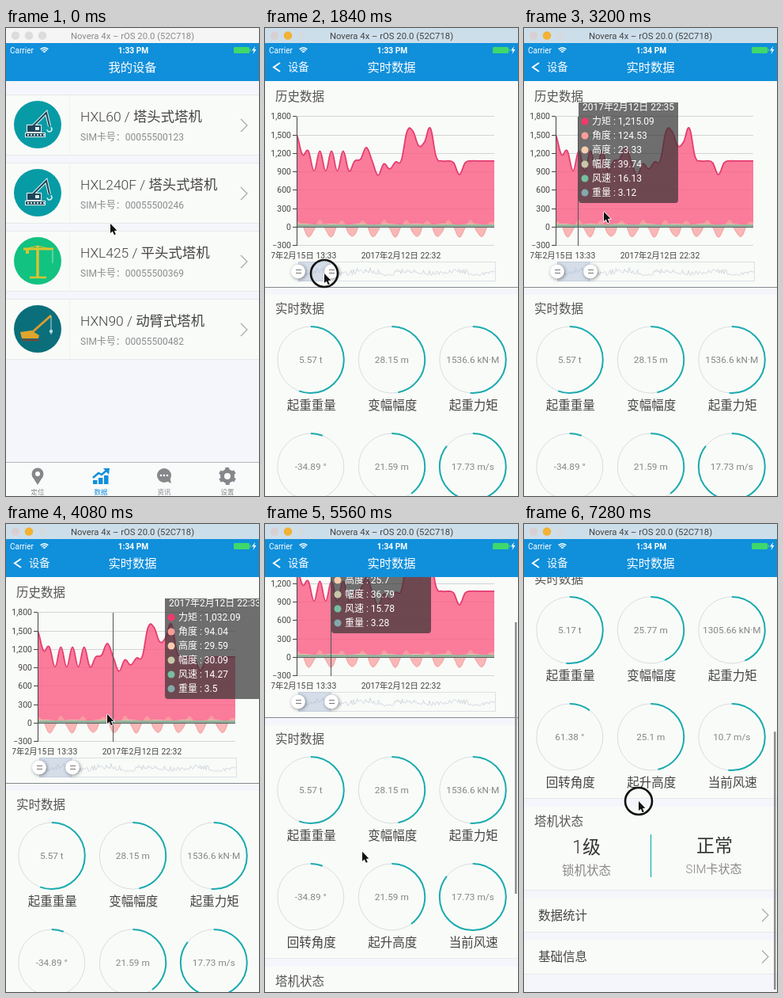
These frames come from a looping animation (320x591 px, 7.4 s). An HTML page with a canvas:

```html
<!DOCTYPE html>
<html lang="zh">
<head>
<meta charset="utf-8">
<style>
html, body { margin: 0; width: 100%; height: 100%; overflow: hidden; background: #f9fbf8; }
canvas { display: block; }
</style>
</head>
<body>
<canvas id="stage" width="320" height="591"></canvas>
<script>
const ctx = document.getElementById('stage').getContext('2d');
const LOOP = 7400, PAPER = '#f9fbf8', BAND = '#f4f6fb', BLUE = '#108fdb', TEAL = '#1aabb0';

// ---- timing ----
// Pointer moves: start, end, target point, and whether the button is down (DRAG also scrolls the page).
const PRESS = 1, DRAG = 2;
const moves = [
  [40, 240, 128, 118], [240, 400, 128, 118, PRESS], [800, 1320, 58, 310], [1520, 1800, 75, 310, PRESS],
  [2280, 2600, 78, 240], [2600, 2840, 70, 238, PRESS], [2840, 3080, 101, 232], [3240, 3600, 135, 238, PRESS],
  [3600, 4080, 128, 240], [4240, 4400, 86, 250, PRESS], [4440, 4640, 97, 380], [4760, 5400, 97, 297, DRAG],
  [5400, 5640, 136, 472], [5640, 6160, 136, 361, DRAG], [6520, 6720, 140, 441], [6880, 7280, 145, 350, DRAG]];

const clamp = v => Math.max(0, Math.min(1, v));
const mix = (a, b, k) => a + (b - a) * k;
const span = (t, a, b) => clamp((t - a) / (b - a));
const easeOut = k => 1 - (1 - k) ** 3;

function pointerAt(t) {
  const p = { x: 132, y: 247, scroll: 0, down: false };
  for (const [from, to, x, y, button] of moves) {
    if (t < from) break;
    const k = span(t, from, to), y0 = p.y;
    p.x = mix(p.x, x, k);
    p.y = mix(y0, y, k);
    p.down = Boolean(button);
    if (button === DRAG) p.scroll += y0 - p.y;
  }
  return p;
}

// ---- drawing helpers ----
function text(s, x, y, size, color, align = 'left', weight = 400) {
  ctx.font = `${weight} ${size}px Roboto, "Noto Sans CJK SC", "Noto Sans CJK", sans-serif`;
  ctx.textAlign = align;
  ctx.fillStyle = color;
  ctx.fillText(s, x, y + size * .37);
}
function rect(x, y, w, h, color) { ctx.fillStyle = color; ctx.fillRect(x, y, w, h); }
function disc(x, y, r, color) { ctx.beginPath(); ctx.arc(x, y, r, 0, 7); ctx.fillStyle = color; ctx.fill(); }
function ring(x, y, r, color, width, from = 0, to = 2 * Math.PI) {
  ctx.beginPath(); ctx.arc(x, y, r, from, to);
  ctx.strokeStyle = color; ctx.lineWidth = width; ctx.stroke();
}
function path(p) {
  ctx.beginPath();
  for (let i = 0; i < p.length; i += 2) ctx.lineTo(p[i], p[i + 1]);
}
function line(color, width, ...p) { path(p); ctx.strokeStyle = color; ctx.lineWidth = width; ctx.stroke(); }
function poly(color, ...p) { path(p); ctx.fillStyle = color; ctx.fill(); }
function rounded(x, y, w, h, r, color) { ctx.beginPath(); ctx.roundRect(x, y, w, h, r); ctx.fillStyle = color; ctx.fill(); }
const chevron = (x, y) => line('#a5a8aa', 1.2, x, y - 8, x + 8, y, x, y + 8);
const heading = (s, y) => text(s, 13, y, 15.5, '#555', 'left', 300);
function group(draw, dx = 0, dy = 0, clip) {
  ctx.save();
  if (clip) { ctx.beginPath(); ctx.rect(...clip); ctx.clip(); }
  ctx.translate(dx, dy);
  draw();
  ctx.restore();
}

// ---- device list ----
const devices = [
  ['HXL60 / 塔头式塔机', '00055500123', '#079ba5', mobileCrane],
  ['HXL240F / 塔头式塔机', '00055500246', '#079ba5', mobileCrane],
  ['HXL425 / 平头式塔机', '00055500369', '#12c281', towerCrane],
  ['HXN90 / 动臂式塔机', '00055500482', '#0a6f7b', luffingCrane]];

function mobileCrane() {
  const body = (color, grow) => {
    line(color, 2 + grow, -6, 2, 11, -15, 15, 2);
    rect(-13 - grow / 2, 1 - grow / 2, 17 + grow, 8 + grow, color);
    rect(-15 - grow / 2, 11 - grow / 2, 24 + grow, 4 + grow, color);
  };
  body('#e3f4f5', 2);
  body('#1f4558', 0);
  rect(-3, 3, 5, 4, '#d9f0f1');
  for (let x = -12; x < 9; x += 4) disc(x, 13, 1.2, '#d9f0f1');
  ring(15, 6, 3, '#e3f4f5', 1.6, -1, 3);
}
function towerCrane() {
  const c = '#d8c430';
  line(c, 3, -18, -15, 20, -15);
  line(c, 1.2, -12, -16, 0, -19, 12, -16);
  line(c, 3.4, 0, -19, 0, 21);
  line(c, 2.5, -10, 21, 11, 21);
  rect(-15, -14, 4, 5, c);
  line('#9de3c4', 1, 19, -13, 19, 3);
}
function luffingCrane() {
  line('#dd9d2c', 3, -10, 7, 17, -17);
  poly('#e0a52c', -22, 4, -8, 2, 2, 8, 1, 12, -20, 12);
  line('#6d4a3c', 2.5, -20, 14, 2, 14);
  line('#b9dcdf', 1, 17, -16, 17, 7);
  disc(17, 3, 2.2, '#b9dcdf');
}
function listPage() {
  rect(0, 67, 320, 524, BAND);
  devices.forEach(([name, sim, color, icon], i) => {
    const y = 85 + i * 86;
    rect(0, y, 320, 75, PAPER);
    line('#e6e9ea', 1, 0, y - .5, 320, y - .5);
    line('#e6e9ea', 1, 0, y + 75.5, 320, y + 75.5);
    line('#eff2f0', 1, 80.5, y, 80.5, y + 75);
    disc(40, y + 37, 30, color);
    group(icon, 40, y + 37);
    text(name, 94, y + 27, 17.4, '#444', 'left', 300);
    text('SIM卡号：' + sim, 94, y + 53, 12, '#8b8d8e');
    chevron(297, y + 38);
  });
  tabBar();
}
function tabBar() {
  const gray = '#85878a';
  rect(0, 548, 320, 43, '#f9fafa');
  line('#b5b8bb', 1, 0, 548.5, 320, 548.5);
  disc(40, 563, 7.5, gray);
  poly(gray, 33, 566, 47, 566, 40, 577);
  disc(40, 563, 3, '#fff');
  for (let i = 0; i < 3; i++) rect(110 + 7 * i, 571 - 3 * i, 5.5, 5 + 3 * i, BLUE);
  line(BLUE, 2.5, 110, 568, 117, 562, 121, 564, 128, 558);
  poly(BLUE, 123, 556, 131, 556, 130, 564);
  disc(200, 565, 9, gray);
  poly(gray, 203, 572, 209, 575, 207, 567);
  for (let x = 196; x <= 204; x += 4) disc(x, 565, 1.3, '#fff');
  ring(280, 566, 6.5, gray, 5);
  for (let a = .5; a < 6.5; a += Math.PI / 3) {
    const c = Math.cos(a), s = Math.sin(a);
    line(gray, 5, 280 + 7 * c, 566 + 7 * s, 280 + 11 * c, 566 + 11 * s);
  }
  ['定位', '数据', '资讯', '设置'].forEach((s, i) => text(s, 40 + 80 * i, 585.5, 8.5, i === 1 ? BLUE : gray, 'center'));
}

// ---- chart ----
const POINTS = 35, GAP = 250 / (POINTS - 1);
const swells = [[.5, 440], [12, 220], [14, -230], [16, -130], [19.5, 800], [21.5, 400], [23, 530], [28, -220]];
const sample = rule => Array.from({ length: POINTS }, (_, i) => rule(i));
// An early zigzag plus a few swells
const torque = sample(i => swells.reduce((sum, [at, size]) => sum + size * Math.exp(-(((i - at) / .7) ** 2)),
  1070 + (i < 10 ? 160 * Math.cos(Math.PI * i) : 0)));
const angle = sample(i => 140 * Math.cos(1.7 * (i - 4)) - 30);
const height = sample(i => 36 + 10 * Math.sin(i * 1.3));
const noise = x => Math.abs(Math.sin(x * 12.9898) * 43758.5453 % 1);
const valueY = v => 251 - v * 23.3 / 300;

function series(data, step, fill, stroke, width) {
  const at = i => [40 + i * step, valueY(data[Math.max(0, Math.min(POINTS - 1, i))])];
  const curve = new Path2D();
  curve.moveTo(...at(0));
  for (let i = 0; i < POINTS - 1; i++) {
    const [a, b, c, d] = [at(i - 1), at(i), at(i + 1), at(i + 2)];
    curve.bezierCurveTo(b[0] + step * .4, b[1] + (c[1] - a[1]) * .2, c[0] - step * .4, c[1] - (d[1] - b[1]) * .2, ...c);
  }
  const area = new Path2D(curve);
  area.lineTo(40 + (POINTS - 1) * step, 251);
  area.lineTo(40, 251);
  ctx.fillStyle = fill; ctx.fill(area);
  ctx.strokeStyle = stroke; ctx.lineWidth = width; ctx.stroke(curve);
}

const legend = [['力矩', '#f4386d'], ['角度', '#fc9d9a'], ['高度', '#f9cdad'], ['幅度', '#c8c8a9'], ['风速', '#76bfa0'], ['重量', '#83a9ab']];
const readings = [
  { at: 2600, index: 4, x: 69, minute: 35, values: '1,215.09 124.53 23.33 39.74 16.13 3.12' },
  { at: 3360, index: 13, x: 201, minute: 33, values: '1,032.09 94.04 29.59 30.09 14.27 3.5' },
  { at: 4240, index: 6, x: 84, minute: 34, values: '1,180.4 −151.06 25.7 36.79 15.78 3.28' }];

function tooltip(t) {
  const shown = readings.filter(r => r.at <= t);
  if (!shown.length) return;
  const now = shown[shown.length - 1], last = shown[shown.length - 2] || now;
  const index = Math.round(mix(last.index, now.index, span(t, now.at, now.at + 240)));
  const px = Math.round(40 + index * GAP) - .5;
  const x = mix(last.x, now.x, easeOut(span(t, now.at, now.at + 440)));
  line('#555', 1, px, 112, px, 275);
  group(() => {
    rounded(x, 87, 126, 134, 4, 'rgba(50,50,50,.7)');
    text('2017年2月12日 22:' + now.minute, x + 5, 100, 12, '#fff');
    now.values.split(' ').forEach((value, i) => {
      const [name, color] = legend[i], y = 118 + 18 * i;
      disc(x + 8, y, 4.5, color);
      text(`${name} : ${value}`, x + 17, y, 12, '#fff');
    });
  }, 0, 0, [8, 94, 312, 140]);
}
function slider(grip) {
  ctx.strokeStyle = '#dde1e6'; ctx.lineWidth = 1;
  ctx.strokeRect(42.5, 295.5, 249, 24);
  ctx.beginPath();
  for (let x = 43; x < 291; x += 1.5) ctx.lineTo(x, 311 - 7 * noise(x) ** 2 - 2 * Math.sin(x / 9));
  ctx.strokeStyle = '#d3d9e0'; ctx.stroke();
  rect(42, 295, grip - 42, 25, 'rgba(160,180,210,.42)');
  for (const x of [42, grip]) {
    ctx.save();
    ctx.shadowColor = 'rgba(0,0,0,.45)'; ctx.shadowBlur = 4; ctx.shadowOffsetX = ctx.shadowOffsetY = 1;
    disc(x, 307.5, 9, '#fff');
    ctx.restore();
    for (const y of [305.5, 309.5]) line('#777', 1, x - 3, y, x + 4, y);
  }
}
function chart(t) {
  const grip = mix(67, 84, span(t, 1520, 1800)), step = GAP * 42 / (grip - 42);
  for (let v = -300; v <= 1800; v += 300) {
    const y = Math.round(valueY(v)) + .5;
    line('#d3d5d6', 1, 40, y, 290, y);
    line('#444', 1, 35, y, 40, y);
    text(v.toLocaleString('en-US').replace('-', '−'), 33, y, 10.5, '#444', 'right');
  }
  group(() => {
    series(torque, step, 'rgba(253,88,128,.78)', '#e53d70', 1.8);
    series(angle, step, 'rgba(250,165,165,.78)', '#f59a9d', 1);
    series(height, step, 'rgba(205,200,165,.8)', '#d5c9a8', 1);
    line('#83af9b', 2, 40, 249.5, 290, 249.5);
  }, 0, 0, [39, 95, 252 * span(t, 760, 1440), 185]);
  line('#46605f', 1, 40, 251.5, 290, 251.5);
  line('#444', 1, 40.5, 112, 40.5, 275);
  group(() => {
    text('2017年2月15日 13:33', 40, 287, 10.4, '#444', 'center');
    text('2017年2月12日 22:32', 172, 287, 10.4, '#444', 'center');
  }, 0, 0, [8, 67, 312, 240]);
  slider(grip);
  tooltip(t);
}

// ---- detail page ----
// label, unit, value before and after the refresh, full scale
const gauges = [
  ['起重重量', ' t', 5.57, 5.17, 10], ['变幅幅度', ' m', 28.15, 25.77, 60], ['起重力矩', ' kN·M', 1536.6, 1305.66, 3000],
  ['回转角度', ' °', -34.89, 61.38, 600], ['起升高度', ' m', 21.59, 25.1, 54], ['当前风速', ' m/s', 17.73, 10.7, 20.7]];

function gauge([label, unit, before, after, full], i, t) {
  const x = 57.8 + 102.5 * (i % 3), y = i < 3 ? 419 : 554;
  const share = mix(Math.abs(before), after, easeOut(span(t, 6480, 6720))) / full;
  ring(x, y, 42, '#d9dde0', 1);
  ring(x, y, 42, TEAL, 2, -Math.PI / 2, (2 * share - .5) * Math.PI);
  text((t < 6520 ? before : after) + unit, x, y, 11.8, '#858788', 'center');
  text(label, x + 1, y + 57.5, 15.5, '#444', 'center');
}
function detailPage(t) {
  rect(0, 67, 320, 900, PAPER);
  heading('历史数据', 86);
  chart(t);
  rect(0, 327, 320, 10, BAND);
  line('#85888c', 1.2, 0, 327.5, 320, 327.5);
  heading('实时数据', 354);
  gauges.forEach((g, i) => gauge(g, i, t));
  for (const y of [631, 747, 800, 853]) {
    rect(0, y, 320, y === 853 ? 120 : 11, BAND);
    line('#e6e9ec', 1, 0, y + .5, 320, y + .5);
  }
  heading('塔机状态', 660);
  text('1级', 79, 692, 23, '#333', 'center', 300);
  text('锁机状态', 79, 722, 15.5, '#888', 'center', 300);
  line(TEAL, 1.2, 160.5, 677, 160.5, 731);
  text('正常', 241, 690, 23, '#333', 'center', 300);
  text('SIM卡状态', 240, 720, 15, '#888', 'center', 300);
  ['数据统计', '基础信息'].forEach((s, i) => {
    text(s, 18, 779 + 52.5 * i, 15.5, '#444');
    chevron(301, 779 + 52.5 * i);
  });
}
function scrollBar(t, scroll) {
  const top = 70 + .65 * scroll + Math.max(0, scroll - 275) * .7;
  ctx.globalAlpha = span(t, 4720, 4800) - span(t, 6520, 6680) + span(t, 6860, 6920);
  line('#8d9092', 2.6, 317.3, top, 317.3, Math.min(588, top + 343));
  ctx.globalAlpha = 1;
}

// ---- frame around the pages ----
function chrome(t, push) {
  const active = t >= 280, green = '#3fd86a';
  rect(0, 0, 320, 19, active ? '#cddeeb' : '#f5f5f5');
  const lights = active ? ['#d9cfd2', '#f3b233', '#d3dbe0'] : Array(3).fill('#dcdcdc');
  lights.forEach((c, i) => disc(12 + 17 * i, 9.5, 5.3, c));
  text('Novera 4x – rOS 20.0 (52C718)', 160, 9.5, 11.3, active ? '#444' : '#8a8a8a', 'center');

  rect(0, 19, 320, 48, BLUE);
  text('Carrier', 5, 28, 10, '#fff');
  for (let r = 2; r < 8; r += 2.5) ring(48.5, 32, r, '#fff', 1.5, -2.35, -.8);
  text(t < 2400 ? '1:33 PM' : '1:34 PM', 161, 28, 10.2, '#fff', 'center', 700);
  rounded(288, 24, 20, 8, 1.5, green);
  rect(308.5, 26.5, 1.5, 3, green);
  poly('#fff', 315, 23, 311, 28.5, 313.5, 28.5, 312.5, 33, 316.5, 27, 314, 27);

  ctx.globalAlpha = 1 - push;
  text('我的设备', 160 - 100 * push, 49, 15.3, '#fff', 'center', 500);
  ctx.globalAlpha = push;
  text('实时数据', 260 - 100 * push, 49, 15.3, '#fff', 'center', 500);
  line('#fff', 2, 19, 44, 11, 49.5, 19, 55);
  text('设备', 29, 49.5, 13.3, '#fff', 'left', 500);
  ctx.globalAlpha = 1;
}
function cursor({ x, y, down }) {
  if (down) ring(x, y, 17, '#111', 2.6);
  const arrow = [0, 0, 0, 12, 2.8, 9.8, 4.8, 14.2, 6.8, 13.4, 4.9, 9.1, 8.4, 8.8, 0, 0];
  group(() => {
    line('#fff', 1.6, ...arrow);
    poly('#111', ...arrow);
  }, x, y);
}

function draw(ms) {
  const t = Math.floor(ms % LOOP / 40) * 40;
  const push = easeOut(span(t, 320, 760)), pointer = pointerAt(t);
  rect(0, 0, 320, 591, PAPER);
  if (push < 1) group(listPage, -96 * push);
  if (push > 0) {
    group(() => detailPage(t), 320 * (1 - push), -pointer.scroll, [0, 67, 320, 524]);
    scrollBar(t, pointer.scroll);
  }
  chrome(t, push);
  cursor(pointer);
}
const start = performance.now();
(function loop() {
  draw(performance.now() - start);
  requestAnimationFrame(loop);
})();
</script>
</body>
</html>
```
